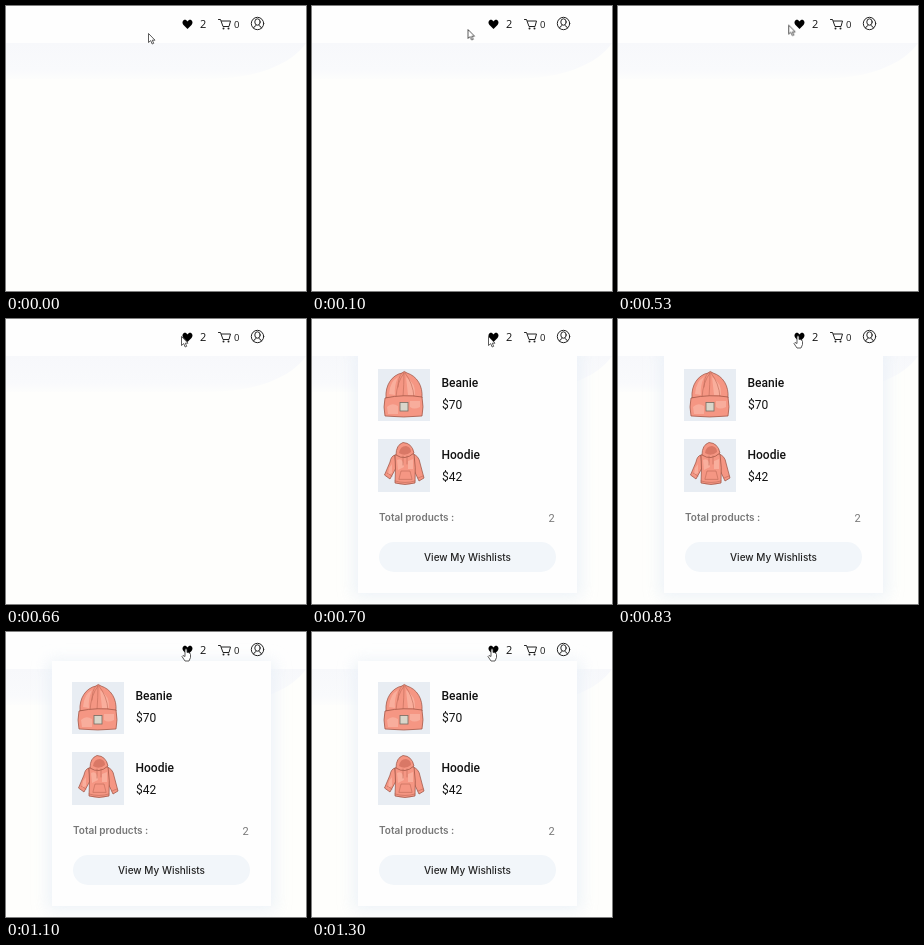
Recreate the animation shown at these times as an HTML page. Size 300 by 285 pixels, loop 2130 ms.

```html
<!DOCTYPE html>
<html lang="en">
<head>
<meta charset="utf-8">
<title>Wishlist dropdown</title>
<style>
  html, body { margin: 0; width: 100%; height: 100%; overflow: hidden; background: #fefefc; }
  svg { display: block; width: 100vw; height: 100vh; }
  text { font-family: Roboto, sans-serif; font-size: 12px; fill: #111; }
  .name { font-weight: 500; }
  .poster { font: 500 10px Inter, sans-serif; fill: #222; }
  .total { font-weight: 600; fill: #777; }
  .count { font: 11px "Open Sans", sans-serif; }
  .line { fill: none; stroke: #222; stroke-width: 1; stroke-linecap: round; stroke-linejoin: round; }
  .fabric { fill: #f59683; stroke: #98503f; stroke-width: .7; stroke-linejoin: round; }
  .fold { fill: none; stroke: #b96553; stroke-width: .55; stroke-linecap: round; }
  .tint { fill: #fab5a4; opacity: .75; }

  .panel, .rise, .arrow, .hand { animation: 2130ms infinite step-end; }
  .panel { animation-name: open; }
  .rise { animation-name: rise; animation-timing-function: linear; }
  .arrow { animation-name: toHand; }
  .hand { animation-name: fromArrow; }
  .move { animation: move 2130ms infinite; }

  @keyframes open { 0% { visibility: hidden } 32.86%, 100% { visibility: visible } }
  @keyframes rise { 0%, 40.38% { opacity: 0 } 48.36%, 100% { opacity: 1 } }
  @keyframes toHand { 0% { visibility: visible } 37.09%, 100% { visibility: hidden } }
  @keyframes fromArrow { 0% { visibility: hidden } 37.09%, 100% { visibility: visible } }
  @keyframes move {
    0% { transform: translate(142px, 27px); animation-timing-function: step-end }
    1.41% { transform: translate(142px, 27px); animation-timing-function: steps(5, jump-both) }
    9.38% { transform: translate(169px, 19px); animation-timing-function: step-end }
    24.88% { transform: translate(169px, 19px); animation-timing-function: steps(4, jump-both) }
    30.98% { transform: translate(175px, 17px); animation-timing-function: step-end }
    32.86%, 100% { transform: translate(176px, 17px) }
  }
</style>
</head>
<body>
<svg viewBox="0 0 300 285" preserveAspectRatio="none">
  <defs>
    <linearGradient id="band" x2="0" y2="1">
      <stop stop-color="#f7f8fb"/>
      <stop offset=".75" stop-color="#f9fafc"/>
      <stop offset="1" stop-color="#fdfdfc"/>
    </linearGradient>
    <filter id="blur" x="-20%" y="-20%" width="140%" height="140%">
      <feGaussianBlur stdDeviation="8"/>
    </filter>
    <clipPath id="below"><path d="M0 37H300V285H0z"/></clipPath>
    <clipPath id="above"><path d="M0 0H300V37H0z"/></clipPath>
    <g id="sheet">
      <rect x="42" y="29" width="227" height="249" fill="#e9f0f7" opacity=".85" filter="url(#blur)"/>
      <rect x="46" y="29" width="219" height="245" fill="#fefefe"/>
    </g>
  </defs>

  <rect width="300" height="285" fill="#fefefc"/>
  <path d="M0 37H300C286 58 250 73 200 73H0z" fill="url(#band)"/>
  <rect width="300" height="37" fill="#fefefe"/>

  <g class="panel">
    <use href="#sheet" clip-path="url(#below)"/>
    <g class="rise"><use href="#sheet" clip-path="url(#above)"/></g>

    <rect x="66" y="50" width="52" height="52" fill="#e8edf3"/>
    <path class="fabric" d="M74 79C73 66 80 56 90 54Q92 51 95 54C105 57 111 67 110 79z"/>
    <path class="tint" d="M77 75Q78 62 86 58Q82 67 83 76zM94 58Q104 64 103 76H96z"/>
    <path class="fold" d="M92 54Q85 63 84 78M92 54Q92 65 91 78M93 54Q101 64 102 78M90 54Q86 58 86 68"/>
    <path class="fabric" d="M73 79Q92 75 110 78Q112 88 110 97Q92 99 73 97Q71 88 73 79z"/>
    <path class="tint" d="M75 88Q80 83 86 87V95H76zM98 82H108V88Q102 91 98 88z"/>
    <rect x="88" y="83.500" width="8" height="8.500" fill="#d9d6ca" stroke="#756c62" stroke-width=".8"/>

    <rect x="66" y="120" width="52" height="53" fill="#e8edf3"/>
    <path class="fabric" d="M83 136Q79 137 78 143L72.500 156L78 160L84 149z"/>
    <path class="fabric" d="M101 135Q107 137 108 144L112 159L107 162L101 149z"/>
    <path class="fabric" d="M83 136Q92 132 102 135Q104 148 103 164Q93 167 83 164Q84 150 83 136z"/>
    <path class="fabric" d="M84 136Q84 126 91 123.500Q100 124 102 134Q93 142 84 136z"/>
    <path d="M87 134Q88 127 94 127Q99 128 99 133Q93 138 87 134z" fill="#d97866"/>
    <path class="tint" d="M85 141Q91 138 92 148L86 151zM96 142L101 140V150H96zM77 149L80 145L80 154L76 156z"/>
    <path class="fold" d="M91 137V146M95 137V145M87 160L89 152H98L100 160zM83 162Q93 165 103 162M75 154L80 157M106 159L111 157"/>

    <text class="name" x="129.500" y="68">Beanie</text>
    <text x="130" y="90">$70</text>
    <text class="name" x="129.500" y="140">Hoodie</text>
    <text x="130" y="162">$42</text>
    <text class="poster total" x="67" y="202">Total products :</text>
    <text x="236.500" y="202.500" style="font-size:11px;fill:#777">2</text>
    <rect x="67" y="223" width="177" height="30" rx="15" fill="#f2f6fa"/>
    <text class="poster" x="155.500" y="241.500" text-anchor="middle">View My Wishlists</text>
  </g>

  <path d="M181.500 23L177.500 19C174.500 15.500 179 11.500 181.500 15.500C184 11.500 188.500 15.500 185.500 19z" fill="#000"/>
  <text class="count" x="194" y="22">2</text>
  <path class="line" d="M212.500 13.500H214.500L217 20.500H223L224.500 15H215.500"/>
  <circle cx="217.500" cy="22.500" r="1" fill="#222"/>
  <circle cx="222.500" cy="22.500" r="1" fill="#222"/>
  <text class="count" x="228" y="22" style="font-size:9.500px">0</text>
  <g class="line">
    <circle cx="251.500" cy="17.500" r="6.200"/>
    <ellipse cx="251.500" cy="16" rx="2.700" ry="3.200"/>
    <path d="M247.500 22Q248 20 250 19.500M255.500 22Q255 20 253 19.500"/>
  </g>

  <g class="arrow">
    <path class="move" d="M.5 .5V9.500L2.700 7.600L4.200 11L5.700 10.300L4.300 7.200H7z"
      fill="#fff" stroke="#333" stroke-width=".8" stroke-linejoin="round"/>
  </g>
  <path class="hand" d="M179 23V17.500Q180 16 181 17.500V20.500Q182.500 20 183 21Q184.500 21 184.500 22.500V25.500L183 29H179L176 24.500Q176.500 22.500 179 24.500z"
    fill="#fff" stroke="#333" stroke-width=".8" stroke-linejoin="round"/>
</svg>
</body>
</html>
```
